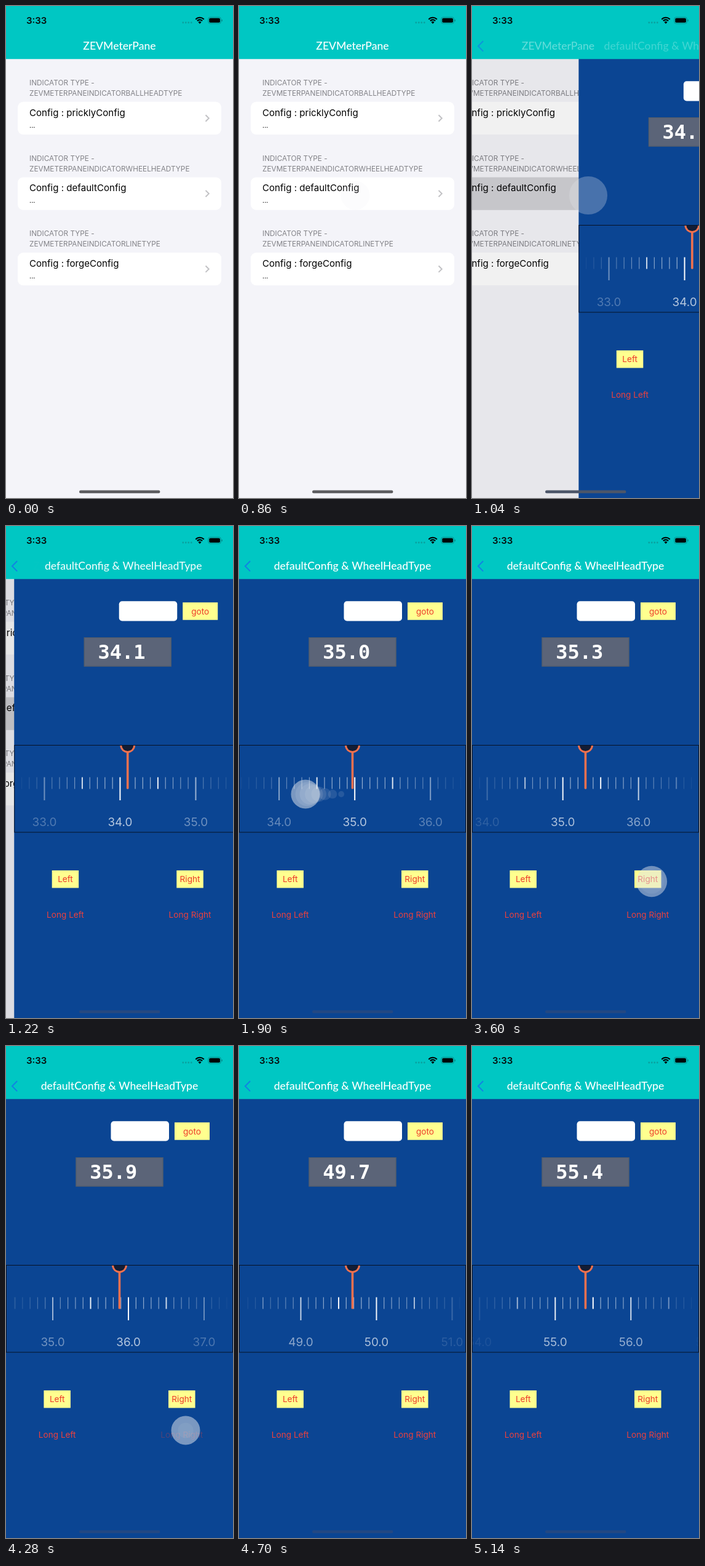
These frames come from a looping animation (369 by 800 pixels, 5160 ms). An HTML page with a canvas:

```html
<!DOCTYPE html>
<html lang="en">
<head>
<meta charset="utf-8">
<title>Ruler demo</title>
<style>
  html, body { margin: 0; width: 100%; height: 100%; overflow: hidden; }
  canvas { display: block; width: 369px; height: 800px; }
</style>
</head>
<body>
<canvas id="stage"></canvas>
<script>
const W = 369, H = 800, MID = 184.5, LOOP = 5160;
const canvas = document.getElementById('stage');
const ctx = canvas.getContext('2d');
const ratio = window.devicePixelRatio || 1;
canvas.width = Math.round(W * ratio);
canvas.height = Math.round(H * ratio);

const SANS = 'Inter, "Liberation Sans", sans-serif';
const TITLE = '500 17.6px Lato, sans-serif';
const MONO = 'bold 32px "DejaVu Sans Mono", monospace';
const TEAL = '#00c7c3', BLUE = '#0b4593', RED = '#ee3a2b', YELLOW = '#ffff8f', ORANGE = '#f0714f';
const UNIT = 123;
const NAV_BOTTOM = 86.2;
const PUSH_AT = 946;

const sections = [
  ['ZEVMETERPANEINDICATORBALLHEADTYPE', 'Config : pricklyConfig'],
  ['ZEVMETERPANEINDICATORWHEELHEADTYPE', 'Config : defaultConfig'],
  ['ZEVMETERPANEINDICATORLINETYPE', 'Config : forgeConfig'],
];

const touches = [
  { x: 189, y: 308, down: 850, up: 945 },
  { x: 292, y: 578, down: 2740, up: 2950, key: 'Right' },
  { x: 292, y: 578, down: 3110, up: 3230, key: 'Right' },
  { x: 292, y: 578, down: 3460, up: 3580, key: 'Right' },
  { x: 292, y: 578, down: 3800, up: 3920, key: 'Right' },
  { x: 292, y: 625, down: 4191, up: 4480, key: 'Long Right' },
];
const drag = { down: 1480, start: 1600, end: 1980, up: 2000, from: 215, to: 104, y: 436 };

const clamp = (v, a = 0, b = 1) => Math.min(b, Math.max(a, v));
const span = (t, start, length) => clamp((t - start) / length);
const mix = (a, b, p) => a + (b - a) * p;
const quad = p => p < .5 ? 2 * p * p : 1 - 2 * (1 - p) ** 2;
const cubic = p => p < .5 ? 4 * p ** 3 : 1 - 4 * (1 - p) ** 3;

// Critically damped spring of the page push
function pushProgress(t) {
  if (t < PUSH_AT) return 0;
  const x = (t - PUSH_AT) * .0187;
  return x > 11 ? 1 : 1 - (1 + x) * Math.exp(-x);
}

const fingerX = t => mix(drag.from, drag.to, cubic(span(t, drag.start, drag.end - drag.start)));

function rulerValue(t) {
  const dragged = 34.1 + (drag.from - fingerX(t)) / UNIT;
  let value = mix(dragged, 35, quad(span(t, drag.up, 220)));
  for (const touch of touches) {
    if (touch.key === 'Right') value += .1 * quad(span(t, touch.down, 150));
    if (touch.key === 'Long Right') value += 20 * quad(span(t, touch.down, 820));
  }
  return value;
}

function rect(x, y, w, h, color, radius = 0) {
  ctx.fillStyle = color;
  ctx.beginPath();
  ctx.roundRect(x, y, w, h, radius);
  ctx.fill();
}

function disc(x, y, r, color) {
  ctx.fillStyle = color;
  ctx.beginPath();
  ctx.arc(x, y, r, 0, Math.PI * 2);
  ctx.fill();
}

function text(str, x, y, font, color, align = 'left') {
  ctx.font = font;
  ctx.fillStyle = color;
  ctx.textAlign = align;
  ctx.fillText(str, x, y);
}

function polyline(points, color, width) {
  ctx.strokeStyle = color;
  ctx.lineWidth = width;
  ctx.beginPath();
  points.forEach(([x, y]) => ctx.lineTo(x, y));
  ctx.stroke();
}

function withAlpha(alpha, draw) {
  ctx.save();
  ctx.globalAlpha *= alpha;
  draw();
  ctx.restore();
}

function drawList(t, p) {
  ctx.save();
  ctx.translate(-.3 * W * p, 0);
  rect(0, 80, W * 1.3, H, '#f4f4f9');
  sections.forEach(([header, label], i) => {
    const y = 155.8 + i * 122.6;
    const selected = i === 1 && t > 870;
    text('INDICATOR TYPE -', 38, y - 26.8, `11.8px ${SANS}`, '#838388');
    text(header, 38, y - 9.6, `11.8px ${SANS}`, '#838388');
    rect(19, y, 331, 53.3, selected ? '#d1d1d6' : '#fff', 9);
    text(label, 38, y + 23, `15.1px ${SANS}`, '#000');
    text('...', 38, y + 42, `11px ${SANS}`, '#000');
    polyline([[324.5, y + 21.5], [329.7, y + 26.7], [324.5, y + 31.9]], '#c2c2c5', 2);
  });
  ctx.restore();
  rect(0, 80, W, H, `rgba(0,0,0,${.1 * p})`);
}

function drawButton(t, label, x, y, boxWidth = 0) {
  const pressed = touches.some(k => k.key === label && t >= k.down && t < k.up);
  if (boxWidth) rect(x - boxWidth / 2, y - 14.2, boxWidth, 28.4, YELLOW);
  withAlpha(pressed ? .3 : 1, () =>
    text(label, x, y + 5, `13.6px ${SANS}`, boxWidth ? RED : '#ec403e', 'center'));
}

function drawRuler(value) {
  ctx.save();
  ctx.beginPath();
  ctx.rect(0, 356, W, 142.5);
  ctx.clip();
  const first = Math.ceil((value - 1.9) * 10), last = Math.floor((value + 1.9) * 10);
  for (let n = first; n <= last; n++) {
    const x = MID + (n / 10 - value) * UNIT;
    const fade = Math.max(.04, Math.cos((x - MID) / MID * Math.PI / 2));
    const whole = n % 10 === 0, bold = n % 5 === 0;
    const width = bold ? 2 : 1.2;
    rect(x - width / 2, 408.5, width, whole ? 37.5 : 19, `rgba(255,255,255,${fade * (bold ? 1 : .58)})`);
    if (whole) {
      text((n / 10).toFixed(1), x, 487.8, `18.9px ${SANS}`, `rgba(255,255,255,${fade * .7})`, 'center');
    }
  }
  rect(MID - 1.8, 367, 3.6, 60.5, ORANGE, 1);
  disc(MID, 356.5, 12.4, ORANGE);
  disc(MID, 356.5, 9.5, '#131d35');
  ctx.restore();
  ctx.strokeStyle = '#071226';
  ctx.lineWidth = 1;
  ctx.strokeRect(.5, 356.5, W - 1, 141.5);
}

function drawDetail(t, p) {
  if (p === 0) return;
  const value = rulerValue(t);
  ctx.save();
  ctx.translate(W * (1 - p), 0);
  rect(0, 80, W + 2, H, BLUE);
  rect(170.5, 122.3, 94.5, 32.2, '#fff', 5);
  drawButton(t, 'goto', 302.5, 138.5, 57);
  rect(113.5, 181, 142, 47.5, '#5b6478');
  ctx.strokeStyle = '#505b68';
  ctx.lineWidth = 1;
  ctx.strokeRect(114, 181.5, 141, 46.5);
  text(value.toFixed(1), 136.2, 216.3, MONO, '#fff');
  drawRuler(value);
  drawButton(t, 'Left', 83.2, 574.3, 43.5);
  drawButton(t, 'Right', 285.8, 574.3, 43.5);
  drawButton(t, 'Long Left', 83.2, 631.5);
  drawButton(t, 'Long Right', 285.8, 631.5);
  ctx.restore();
}

function drawStatus() {
  text('3:33', 33, 28.8, `600 15px ${SANS}`, '#07100f');
  for (let i = 0; i < 4; i++) disc(287.8 + i * 4.5, 27, 1.4, '#0aa19f');
  ctx.strokeStyle = '#000';
  ctx.lineWidth = 2.1;
  for (const r of [5.6, 9.2]) {
    ctx.beginPath();
    ctx.arc(315, 28, r, -Math.PI * .76, -Math.PI * .24);
    ctx.stroke();
  }
  ctx.fillStyle = '#000';
  ctx.beginPath();
  ctx.moveTo(315, 29);
  ctx.arc(315, 28.5, 3.4, -Math.PI * .76, -Math.PI * .24);
  ctx.fill();
  ctx.strokeStyle = '#068f8d';
  ctx.lineWidth = 1;
  ctx.beginPath();
  ctx.roundRect(328.8, 18.2, 20.6, 10.4, 3);
  ctx.stroke();
  rect(330.3, 19.7, 17.6, 7.4, '#000', 1.8);
  rect(350.5, 21.7, 1.4, 3.6, '#068f8d', 1);
}

function drawNav(p) {
  rect(0, 0, W, NAV_BOTTOM, TEAL);
  drawStatus();
  withAlpha((1 - p) ** 1.3, () =>
    text('ZEVMeterPane', MID - 84 * p, 71, TITLE, '#fff', 'center'));
  if (p === 0) return;
  withAlpha(p ** 2.2, () =>
    text('defaultConfig & WheelHeadType', MID + 409 * (1 - p) ** 1.26, 71, TITLE, '#fff', 'center'));
  withAlpha(clamp(p * 1.4), () =>
    polyline([[18.2, 57], [10, 65.3], [18.2, 73.6]], '#1283e2', 2));
}

function drawHomeBar(p) {
  const color = [[92, 35], [92, 72], [95, 131]].map(([a, b]) => mix(a, b, p * p));
  rect(119, 787.5, 131.5, 4.8, `rgb(${color})`, 2.4);
}

const touchColor = a => `rgba(222,226,234,${a})`;

function drawTouch(t, { x, y, down, up }) {
  if (t < down || t > up + 210) return;
  const leave = span(t, up, 210);
  const alpha = .53 * span(t, down, 60) * (1 - leave);
  disc(x, y, 23.5 + 16.5 * leave, touchColor(alpha));
  const pulse = span(t, down, 150);
  if (pulse < 1) disc(x, y, 21 * pulse, touchColor(.08));
}

function drawDrag(t) {
  if (t < drag.down || t > drag.up + 210) return;
  const x = fingerX(t);
  for (let k = 7; k > 0; k--) {
    const ghost = fingerX(t - k * 17);
    if (ghost - x > .5) disc(ghost, drag.y, 22 * (1 - k / 9), touchColor(.13));
  }
  drawTouch(t, { ...drag, x });
}

function render(t) {
  const p = pushProgress(t);
  ctx.setTransform(ratio, 0, 0, ratio, 0, 0);
  ctx.clearRect(0, 0, W, H);
  drawList(t, p);
  drawDetail(t, p);
  drawNav(p);
  drawHomeBar(p);
  touches.forEach(touch => drawTouch(t, touch));
  drawDrag(t);
}

const began = performance.now();
function tick() {
  render((performance.now() - began) % LOOP);
  requestAnimationFrame(tick);
}
tick();
</script>
</body>
</html>
```
